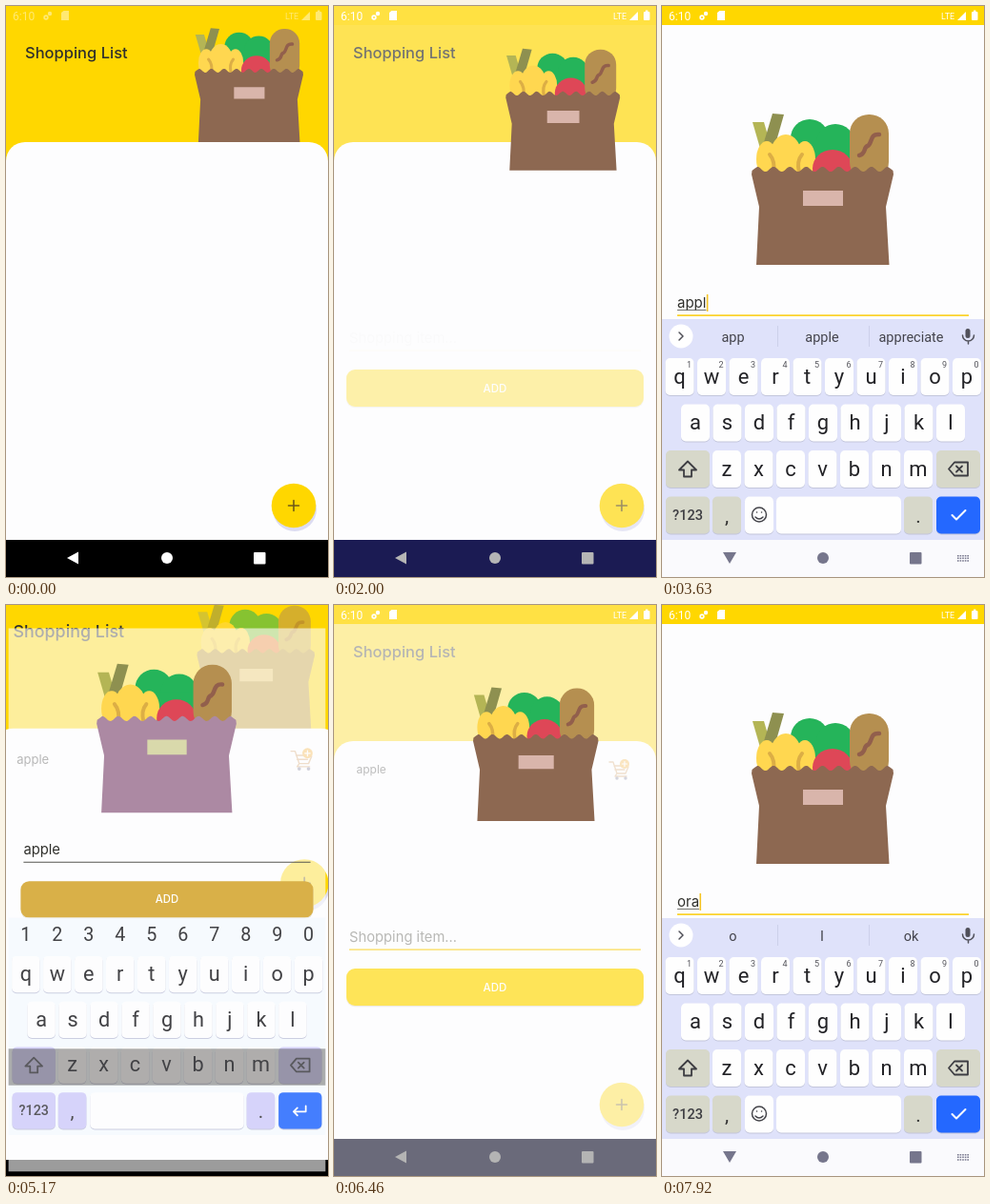
Recreate the animation shown at these times as an HTML page with a canvas. Size 338 px wide and 600 px high, loop 8 s.

```html
<!DOCTYPE html>
<html lang="en">
<head>
<meta charset="utf-8">
<title>Shopping list</title>
<style>
html, body { margin: 0; width: 100%; height: 100%; overflow: hidden; background: #fdfdfe; }
canvas { display: block; width: 338px; height: 600px; }
</style>
</head>
<body>
<canvas id="stage"></canvas>
<script>
const W = 338, H = 600, LOOP = 8000;
const dpr = window.devicePixelRatio || 1;

function sized(canvas) {
  canvas.width = W * dpr;
  canvas.height = H * dpr;
  return canvas.getContext('2d');
}

let ctx = sized(document.getElementById('stage'));
const layers = [];
let depth = 0;

const YELLOW = '#ffd700', WHITE = '#fdfdfe', INK = '#30302c';
const UI = 'Inter, sans-serif', KEYS = 'Roboto, sans-serif';
const FULL_TONES = { paper: '#8d6851', tag: '#d9b5ab', button: YELLOW };
const LEAVING_TONES = { paper: '#ac89a3', tag: '#d9d9ab', button: '#d9b048' };
const OPEN_MS = 700, RETURN_AT = 5085, RETURN_MS = 400, UNFOCUS_AT = 4300;
const sessions = [
  { open: 1846, keyboard: 2658, typing: [[3000, 'a'], [3180, 'ap'], [3360, 'app'], [3560, 'appl'], [3780, 'apple']] },
  { open: 6215, keyboard: 7020, typing: [[7480, 'o'], [7640, 'or'], [7840, 'ora']] }
];

const clamp = x => Math.max(0, Math.min(1, x));
const mix = (a, b, p) => a + (b - a) * p;
const rgb = (...parts) => `rgb(${parts.map(Math.round)})`;

// Fast-out, slow-in: cubic-bezier(.4, 0, .2, 1)
function ease(x) {
  x = clamp(x);
  let lo = 0, hi = 1;
  for (let i = 0; i < 22; i++) {
    const s = (lo + hi) / 2, r = 1 - s;
    if (1.2 * r * r * s + 0.6 * r * s * s + s * s * s < x) lo = s; else hi = s;
  }
  return lo * lo * (3 - 2 * lo);
}

// Paints onto a spare layer so that overlapping parts fade as one.
function group(alpha, paint) {
  if (alpha <= 0) return;
  if (alpha >= 1) return paint();
  const outer = ctx;
  const layer = layers[depth] ??= sized(document.createElement('canvas'));
  layer.resetTransform();
  layer.clearRect(0, 0, W * dpr, H * dpr);
  layer.setTransform(outer.getTransform());
  ctx = layer;
  depth++;
  paint();
  depth--;
  ctx = outer;
  ctx.save();
  ctx.resetTransform();
  ctx.globalAlpha = alpha;
  ctx.drawImage(layer.canvas, 0, 0);
  ctx.restore();
}

function zoom(k, paint) {
  ctx.save();
  ctx.translate(W / 2, H / 2);
  ctx.scale(k, k);
  ctx.translate(-W / 2, -H / 2);
  paint();
  ctx.restore();
}

function rect(x, y, w, h, color, r = 0) {
  ctx.fillStyle = color;
  ctx.beginPath();
  ctx.roundRect(x, y, w, h, r);
  ctx.fill();
}

function disc(x, y, rx, color, ry = rx) {
  ctx.fillStyle = color;
  ctx.beginPath();
  ctx.ellipse(x, y, rx, ry, 0, 0, Math.PI * 2);
  ctx.fill();
}

function poly(points, color) {
  ctx.fillStyle = color;
  ctx.beginPath();
  points.forEach(([x, y]) => ctx.lineTo(x, y));
  ctx.closePath();
  ctx.fill();
}

function stroke(path, color, width = 1.5) {
  ctx.strokeStyle = color;
  ctx.lineWidth = width;
  ctx.lineCap = ctx.lineJoin = 'round';
  ctx.stroke(new Path2D(path));
}

function text(s, x, y, size, color, family = UI, align = 'left', weight = 400) {
  ctx.font = `${weight} ${size}px ${family}`;
  ctx.textAlign = align;
  ctx.fillStyle = color;
  ctx.fillText(s, x, y);
}

// Drawn in a 149 x 159 box, then placed by centre and width.
function bag(cx, cy, width, tones = FULL_TONES) {
  ctx.save();
  ctx.translate(cx, cy);
  ctx.scale(width / 149, width / 149);
  ctx.translate(-74.5, -79.5);
  poly([[1, 9], [13, 9], [22, 40], [10, 40]], '#b4b555');
  poly([[22, 0], [34, 1], [24, 36], [13, 30]], '#8e9050');
  disc(61, 26, 20, '#25b45a');
  disc(88, 31, 20, '#25b45a');
  rect(50, 30, 55, 34, '#25b45a');
  disc(16, 48, 11, '#ffd750', 19);
  disc(56, 48, 11, '#ffd750', 19);
  disc(36, 46, 17, '#ffd750', 24);
  stroke('M19 43Q25 50 23 62M53 43Q47 50 50 62', '#dcae45', 4);
  disc(85, 58, 21, '#de4757', 20);
  rect(103, 1, 41, 70, '#b58f50', 20);
  stroke('M134 22C124 21 127 31 122 34C117 35 121 42 113 44', '#925f4c', 4.5);

  const rim = [];
  for (let x = 6; x <= 143; x++) rim.push([x, 58.5 - 2.6 * Math.cos((x - 6) / 137 * Math.PI * 16)]);
  poly([[8, 98], [0, 64], [0.5, 60], [3, 58], ...rim, [146, 58], [148.5, 60], [149, 64],
    [141, 98], [144.5, 159], [5, 159]], tones.paper);
  rect(54, 81, 42, 16, tones.tag);
  ctx.restore();
}

const HOME_BAG = [255, 84, 114];

function statusBar(alpha = 1) {
  rect(0, 0, W, 20, YELLOW);
  group(alpha, () => {
    text('6:10', 7, 14.5, 12, '#fff', KEYS);
    disc(42, 12, 2.7, '#fff');
    disc(46, 8, 2.2, '#fff');
    disc(42, 12, 1, YELLOW);
    poly([[58, 7], [60.5, 5], [66, 5], [66, 15], [58, 15]], '#fff');
    text('LTE', 293, 13.5, 9, '#fff', KEYS);
    poly([[310, 15], [319, 6], [319, 15]], '#fff');
    rect(325, 6, 6.5, 9, '#fff', 1);
    rect(327, 4.5, 2.5, 2, '#fff');
  });
}

function navBar(back, icon, keyboardUp) {
  rect(0, 561, W, 39, back);
  poly(keyboardUp ? [[64, 574], [78, 574], [71, 586]] : [[64, 580], [76, 573.5], [76, 586.5]], icon);
  disc(169, 580, 6, icon);
  rect(260, 574, 12.5, 12.5, icon, 1);
  if (!keyboardUp) return;
  for (let i = 0; i < 15; i++) rect(310 + i % 5 * 2.6, 577 + Math.floor(i / 5) * 2.6, 1.6, 1.5, icon);
}

function cart(x, y) {
  stroke(`M${x - 10} ${y - 8}h4l4 12h9l3 -7M${x - 5} ${y - 4}h9M${x - 4} ${y}h10M${x - 2} ${y + 4}l-2 3h12`, '#d9ac78', 1.3);
  disc(x - 2, y + 9, 1.7, '#8a8aa0');
  disc(x + 7, y + 9, 1.7, '#8a8aa0');
  disc(x + 6, y - 6, 5, '#f7b94c');
  stroke(`M${x + 3.5} ${y - 6}h5m-2.5 -2.5v5`, '#fff', 1.2);
}

function listScreen({ item, fabY = 525, bagAlpha = 1, status = 1, navIcon = '#fff' }) {
  rect(0, 0, W, H, YELLOW);
  statusBar(status);
  text('Shopping List', 20, 55, 16.5, INK, UI, 'left', 500);
  group(bagAlpha, () => bag(...HOME_BAG));
  rect(0, 143, W, 440, WHITE, 20);
  if (item) {
    text('apple', 23.5, 177, 12, '#4a4a48');
    cart(299, 173);
  }
  disc(303, fabY + 4, 23, '#dcdcf2');
  disc(302, fabY, 23.3, YELLOW);
  stroke(`M296.5 ${fabY}h11m-5.5 -5.5v11`, '#6e5a18', 1.6);
  navBar('#000', navIcon, false);
}

function form(shift, typed, { focused = true, caret = true, inputAlpha = 1, tones = FULL_TONES }) {
  ctx.save();
  ctx.translate(0, shift);
  group(inputAlpha, () => {
    text(typed || 'Shopping item…', 16, 353.5, typed ? 15 : 14.75, typed ? INK : '#85857f');
    const end = typed ? 16 + ctx.measureText(typed).width : 16;
    if (focused && typed) rect(16, 356, end - 16, 0.8, '#55554f');
    if (focused && caret) rect(end + 0.4, 340, 1.6, 18, '#f5c526');
    rect(16, 361.2, 306, focused ? 1.8 : 1, focused ? '#fbd32c' : '#55554f');
  });
  rect(13, 383.2, 312, 39, '#e9e4d8', 9);
  rect(13, 382, 312, 39, tones.button, 9);
  text('ADD', 169, 405.7, 11.5, '#fff', UI, 'center', 500);
  ctx.restore();
}

function key(x, y, w, color) {
  rect(x, y + 1, w, 39, '#c3c6dc', 5);
  rect(x, y, w, 39, color, 5);
}

function mic() {
  rect(318.5, 339, 5, 10, '#50505a', 2.5);
  stroke('M315.5 346a6 6 0 0 0 12 0M321.5 352v3', '#50505a', 1.5);
}

function toolStrip() {
  disc(20, 347, 12.5, '#fff');
  stroke('M22 343l-4 4l4 4', '#505058');
  const c = '#74747e';
  stroke('M59 341h13v8l-5 5h-8zM67 354v-5h5M62 345h1m5 0h1M62 349q2 2 4 0', c);
  text('GIF', 114, 351.5, 12, c, KEYS, 'center', 700);
  stroke('M158 341.5h11v13h-11zM161 341v-2h5v2M161 346h5M161 349h5M161 352h3', c);
  for (let i = 0; i < 8; i++) {
    const a = i * Math.PI / 4;
    disc(212 + 5.3 * Math.cos(a), 347.5 + 5.3 * Math.sin(a), 1.8, c);
  }
  disc(212, 347.5, 5.3, c);
  disc(212, 347.5, 2.3, '#eef2ff');
  rect(241, 338, 1.5, 18, '#c3c9ec');
  [267, 272, 277].forEach(x => disc(x, 347.5, 1.7, c));
  mic();
}

function wordStrip(words) {
  disc(20, 347, 12.5, '#fff');
  stroke('M18 343l4 4l-4 4', '#505058');
  words.forEach((w, i) => text(w, 74.5 + i * 93.5, 353, 14.5, '#44444c', KEYS, 'center'));
  rect(121, 336, 1, 22, '#ccd0ea');
  rect(217, 336, 1, 22, '#ccd0ea');
  mic();
}

function keyboard(top, { words, plain, band, bandAlpha = 0 }) {
  const rows = ['qwertyuiop', 'asdfghjkl', 'zxcvbnm'];
  const starts = [18.5, 35, 68], tops = [370, 418.5, 467];
  const back = plain ? '#f5faff' : words ? '#dfe2fa' : '#e8f2ff';
  const special = plain ? '#d0ccfa' : words ? '#d7d8ca' : back;
  ctx.save();
  ctx.translate(0, top - 329);
  rect(0, 329, W, plain ? 232 : 271, back);

  rows.forEach((row, r) => [...row].forEach((_, i) => key(starts[r] + i * 33.5 - 15, tops[r], 30, '#fefefe')));
  key(4, 467, 46, special);
  key(288, 467, 46, special);
  key(4, 515.5, 46, special);
  key(53, 515.5, 30, special);
  if (!plain) key(87, 515.5, 30, '#fefefe');
  key(plain ? 87 : 120, 515.5, plain ? 164 : 131, '#fefefe');
  key(254, 515.5, 30, special);
  key(288, 515.5, 46, '#2468ff');
  if (band) group(bandAlpha, () => rect(0, band[0] - top + 329, W, band[1], '#1a1610'));

  rows.forEach((row, r) => [...row].forEach((c, i) => {
    const x = starts[r] + i * 33.5;
    text(c, x, tops[r] + 26.5, 22, '#222226', KEYS, 'center');
    if (r) return;
    const digit = (i + 1) % 10;
    if (plain) text(digit, x, 354, 20, '#222226', KEYS, 'center');
    else text(digit, x + 10, 380, 9, '#55555c', KEYS, 'center');
  }));
  stroke('M27 478.5l-9 9h5v7h8v-7h5z', '#3d3d42', 1.8);
  stroke('M307 479.5h14v14h-14l-6 -7zM309 483.5l6 6m0 -6l-6 6', '#3d3d42', 1.8);
  text('?123', 27, 540, 14.5, '#3d3d42', KEYS, 'center', 500);
  text(',', 68, 543, 21, '#333', KEYS, 'center');
  text('.', 269, 543, 21, '#333', KEYS, 'center');
  if (plain) {
    stroke('M317 530v6h-13m4 -4l-4 4l4 4', '#fff', 1.8);
  } else {
    stroke('M109.5 534.5a7.5 7.5 0 1 1 -15 0a7.5 7.5 0 1 1 15 0M98 537q4 4 8 0M99.5 532h.1M104.5 532h.1', '#44444a');
    stroke('M304.5 535l4.5 4.5l9.5 -9.5', '#fff', 2);
    if (words) wordStrip(words); else toolStrip();
  }
  ctx.restore();
}

function typedAt(t, session) {
  return session.typing.reduce((last, [at, word]) => t >= at ? word : last, '');
}

function suggestions(typed) {
  if (!typed) return null;
  if (typed[0] === 'o') return ['o', 'I', 'ok'];
  return typed.length > 1 ? ['app', 'apple', 'appreciate'] : ['a', 'I', 'and'];
}

function openScreen(t, session, item) {
  const p = (t - session.open) / OPEN_MS;
  const fade = clamp((p - 0.086) * 2.46);
  const move = ease(p);
  const rise = ease((t - session.keyboard) / 300);
  const follow = ease((t - session.keyboard - 6) / 300);
  const plain = !item && t >= UNFOCUS_AT;
  const typed = typedAt(t, session);
  const shift = -37 * follow - (plain ? 55 * ease((t - UNFOCUS_AT) / 300) : 0);

  if (fade < 1) listScreen({ item, bagAlpha: 0 });
  group(fade, () => rect(0, 20, W, 541, WHITE));
  statusBar();
  group(0.3 * Math.sin(Math.PI * fade), () => rect(0, 0, W, 20, '#fff'));

  // The bar passes through navy on its way from black to white.
  const level = 252 * fade * fade;
  const icon = fade < 1 ? mix(255, 180, clamp(fade * 3)) : 115;
  navBar(rgb(level, level, level + 560 * fade * (1 - fade) ** 3), rgb(icon, icon, icon), false);

  group(fade, () => form(shift, typed, {
    focused: !plain,
    caret: fade === 1,
    inputAlpha: clamp((fade - 0.3) * 2.5)
  }));
  const [hx, hy, hw] = HOME_BAG;
  bag(mix(hx, 168.5, move), mix(hy, 229.5, move) + shift, mix(hw, 149, move));
  if (rise <= 0) return;
  keyboard(600 - 271 * rise, {
    words: suggestions(typed),
    plain,
    band: [536, 64],
    bandAlpha: 0.35 * clamp((1 - rise) * 4)
  });
  if (rise > 0.995) navBar('#fafafd', '#76768c', true);
}

function returnScreen(t) {
  const p = (t - RETURN_AT) / RETURN_MS;
  const e = ease(p);
  const drop = ease((t - 5200) / 260);
  const out = clamp(1 - 1.8 * p);
  zoom(1.1 - 0.1 * e, () => listScreen({
    item: true,
    fabY: mix(293, 525, drop),
    bagAlpha: clamp(p * 2.6),
    navIcon: p < 0.5 ? '#000' : '#fff'
  }));
  zoom(1 - 0.1 * e, () => {
    group(out, () => rect(0, 20, W, 580, WHITE));
    group(out * 1.7, () => {
      form(-92, 'apple', { focused: false, tones: LEAVING_TONES });
      bag(168.5, 137.5, 149, LEAVING_TONES);
    });
    if (drop < 1) group(0.85, () => keyboard(mix(329, 600, drop), {
      plain: true, band: [469, 39], bandAlpha: 0.65 * out
    }));
  });
}

function draw(t) {
  ctx.setTransform(dpr, 0, 0, dpr, 0, 0);
  const item = t >= RETURN_AT;
  const session = sessions[item ? 1 : 0];
  if (item && t < RETURN_AT + RETURN_MS) returnScreen(t);
  else if (t < session.open) listScreen({ item, status: item ? 1 : mix(0.45, 1, clamp(t / 400)) });
  else openScreen(t, session, item);
}

let start;
function tick(now) {
  start ??= now;
  draw((now - start) % LOOP);
  requestAnimationFrame(tick);
}
draw(0);
requestAnimationFrame(tick);
</script>
</body>
</html>
```
